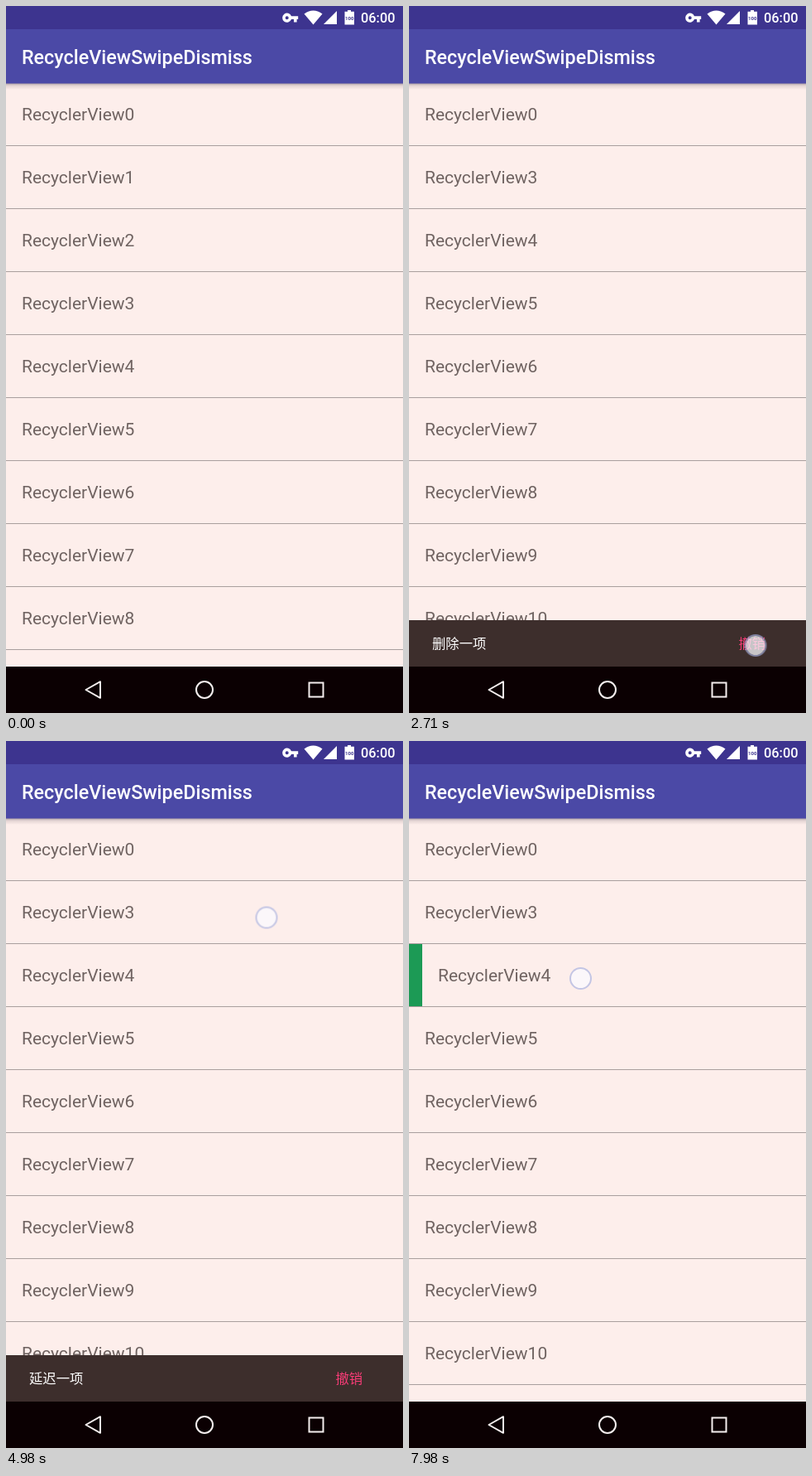
Write an HTML page that moves like this. It is 480 px wide and 853 px high and loops after 8000 ms.

```html
<!DOCTYPE html>
<html lang="zh">
<head>
<meta charset="utf-8">
<title>RecycleViewSwipeDismiss</title>
<style>
:root {
  --page: #fdeeeb;
  --move: cubic-bezier(.37, 0, .63, 1);
  --drag: cubic-bezier(.5, 0, .8, .7);
  --slide: cubic-bezier(.4, 0, .2, 1);
}
html, body { margin: 0; width: 100%; height: 100%; overflow: hidden; background: var(--page); }
#stage { position: relative; width: 480px; height: 853px; overflow: hidden; background: var(--page); }
#list { position: absolute; top: 93px; width: 480px; height: 704px; overflow: hidden; }

.row { position: relative; height: 76px; }
.line { position: absolute; top: 75px; width: 480px; height: 1px; background: #a99f9e; }
.body { position: absolute; width: 480px; height: 75px; overflow: hidden; }
.card, .under, .under svg { position: absolute; width: 480px; height: 75px; }
.card {
  background: var(--page); color: #6f6361; text-indent: 19px;
  font: 21px/77px Roboto, sans-serif; white-space: nowrap;
}
.done { background: #1c9a55; }
.later { background: #ee6d0c; }
.under path, .under circle { fill: none; stroke: #fff; stroke-width: 2.3; }

/* Every animation shares one 8 s clock: 1% = 80 ms */
.g2, .g3, .g4, .r1 *, .r2 *, .r3 *, .r4 *, #snack, #snack text, #dot, #dot i {
  animation-duration: 8s; animation-iteration-count: infinite; animation-timing-function: linear;
}

.g2 { animation-name: g2; animation-timing-function: var(--move); }
.g3 { animation-name: g3; animation-timing-function: var(--move); }
.g4 { animation-name: g4; animation-timing-function: var(--move); }
@keyframes g2 { 0%, 12.59% { transform: none } 15.71%, 100% { transform: translateY(-76px) } }
@keyframes g3 {
  0%, 25.56%, 39.38%, 54.69% { transform: none }
  28.69%, 36.25%, 57.81%, 100% { transform: translateY(-76px) }
}
@keyframes g4 {
  0%, 68.88%, 84.75%, 100% { transform: none }
  72%, 81.63% { transform: translateY(-76px) }
}

.r1 .card { animation-name: swipe1; }
.r2 .card { animation-name: swipe2; }
.r3 .card { animation-name: swipe3; }
.r4 .card { animation-name: swipe4; }
@keyframes swipe1 {
  0% { transform: none }
  6.88% { transform: none; animation-timing-function: var(--drag) }
  9.56% { transform: translateX(230px); animation-timing-function: ease-out }
  11.06%, 100% { transform: translateX(480px) }
}
@keyframes swipe2 {
  0% { transform: none }
  20% { transform: none; animation-timing-function: var(--drag) }
  22.63% { transform: translateX(230px); animation-timing-function: ease-out }
  24.13%, 35% { transform: translateX(480px) }
  35.01% { transform: none }
  48.75% { transform: none; animation-timing-function: var(--drag) }
  51.5% { transform: translateX(-240px); animation-timing-function: ease-out }
  53%, 100% { transform: translateX(-480px) }
}
@keyframes swipe3 {
  0% { transform: none }
  63.13% { transform: none; animation-timing-function: var(--drag) }
  65.88% { transform: translateX(-240px); animation-timing-function: ease-out }
  67.38%, 80% { transform: translateX(-480px) }
  80.01%, 100% { transform: none }
}
@keyframes swipe4 {
  0% { transform: none }
  97.88% { transform: none; animation-timing-function: var(--drag) }
  99.75%, 100% { transform: translateX(16px) }
}

.r1 .body { animation-name: fade1; }
.r2 .body { animation-name: fade2; }
.r3 .body { animation-name: fade3; }
@keyframes fade1 { 0%, 11.06% { opacity: 1 } 12.54%, 100% { opacity: 0 } }
@keyframes fade2 {
  0%, 24.13%, 40.85%, 53.28% { opacity: 1 }
  25.5%, 39.38%, 54.69%, 100% { opacity: 0 }
}
@keyframes fade3 {
  0%, 67.38%, 86.23%, 100% { opacity: 1 }
  68.85%, 84.75% { opacity: 0 }
}

.r1 .line { animation-name: line1; animation-timing-function: step-end; }
.r2 .line { animation-name: line2; animation-timing-function: step-end; }
.r3 .line { animation-name: line3; animation-timing-function: step-end; }
@keyframes line1 { 0% { opacity: 1 } 12.59%, 100% { opacity: 0 } }
@keyframes line2 { 0%, 36.25% { opacity: 1 } 25.56%, 54.69%, 100% { opacity: 0 } }
@keyframes line3 { 0%, 81.63%, 100% { opacity: 1 } 68.88% { opacity: 0 } }

/* The second row is first deleted, later postponed */
.r2 .later { animation-name: secondHalf; animation-timing-function: step-end; }
.r1 .later, .r4 .later { display: none; }
@keyframes secondHalf { 0% { opacity: 0 } 45%, 100% { opacity: 1 } }
@keyframes firstHalf { 0% { opacity: 1 } 45%, 100% { opacity: 0 } }

#tray { position: absolute; top: 741px; width: 480px; height: 56px; overflow: hidden; }
#snack {
  position: absolute; width: 480px; height: 56px; background: #3d2e2c;
  animation-name: snack; animation-timing-function: var(--slide);
}
#snack svg { display: block; }
#snack text { font: 16.33px "Noto Sans CJK SC", "Noto Sans CJK", sans-serif; fill: #fff; }
#snack .act { fill: #f83c77; }
#snack .labels { animation: labels 8s linear infinite; }
#snack .del { animation-name: firstHalf; animation-timing-function: step-end; }
#snack .post { animation-name: secondHalf; animation-timing-function: step-end; }
@keyframes snack {
  0%, 11.13%, 27.5%, 27.63%, 39.38%, 53.28%, 70.63%, 84.75%, 100% { transform: translateY(56px) }
  14.25%, 24.38%, 30.75%, 36.25%, 56.4%, 67.5%, 73.75%, 81.63% { transform: none }
}
@keyframes labels {
  0%, 12%, 26.63%, 28.5%, 38.5%, 54.16%, 69.75%, 71.5%, 83.88%, 100% { opacity: 0 }
  14.25%, 24.38%, 30.75%, 36.25%, 56.4%, 67.5%, 73.75%, 81.63% { opacity: 1 }
}

#chrome { position: absolute; inset: 0; }
#chrome text { font-family: Roboto, sans-serif; font-weight: 500; fill: #fff; }
.nav { fill: none; stroke: #f4eeee; stroke-width: 2; }

#dot { position: absolute; left: 0; top: 0; animation-name: dot; }
#dot i {
  position: absolute; left: -13.5px; top: -13.5px; width: 27px; height: 27px; box-sizing: border-box;
  border: 2px solid rgba(165, 175, 225, .65); border-radius: 50%;
  background: rgba(250, 250, 255, .74); background-clip: padding-box;
  animation-name: press; animation-timing-function: step-end;
}
@keyframes dot {
  0% { transform: translate(191px, 212px) }
  6.88% { transform: translate(191px, 212px); animation-timing-function: var(--drag) }
  9.56% { transform: translate(421px, 214px) }
  9.57% { transform: translate(191px, 212px) }
  20% { transform: translate(191px, 212px); animation-timing-function: var(--drag) }
  22.63% { transform: translate(421px, 214px) }
  22.64%, 37% { transform: translate(418.5px, 771px) }
  37.01% { transform: translate(314.5px, 212.5px) }
  48.75% { transform: translate(314.5px, 212.5px); animation-timing-function: var(--drag) }
  51.5% { transform: translate(74.5px, 213px) }
  51.51% { transform: translate(314.5px, 212.5px) }
  63.13% { transform: translate(314.5px, 212.5px); animation-timing-function: var(--drag) }
  65.88% { transform: translate(74.5px, 213px) }
  65.89%, 84% { transform: translate(418.5px, 771px) }
  84.01% { transform: translate(191px, 286px) }
  97.88% { transform: translate(191px, 286px); animation-timing-function: var(--drag) }
  99.75%, 100% { transform: translate(207px, 286px) }
}
@keyframes press {
  0%, 9.56%, 22.63%, 36%, 51.5%, 65.88%, 81.38% { opacity: 0 }
  5.87%, 19%, 33.85%, 47.74%, 62.23%, 78.87%, 96.87%, 100% { opacity: 1 }
}
</style>
</head>
<body>
<div id="stage">
  <div id="list"></div>

  <div id="tray">
    <div id="snack">
      <svg width="480" height="56">
        <g class="labels">
          <text class="del" x="28" y="34">删除一项</text>
          <text class="post" x="28" y="34">延迟一项</text>
          <text class="act" x="398.5" y="34">撤销</text>
        </g>
      </svg>
    </div>
  </div>

  <svg id="chrome" width="480" height="853">
    <defs>
      <linearGradient id="shade" x2="0" y2="1">
        <stop offset="0" stop-color="#3c2c3c" stop-opacity=".42"/>
        <stop offset=".4" stop-color="#3c2c3c" stop-opacity=".13"/>
        <stop offset="1" stop-color="#3c2c3c" stop-opacity="0"/>
      </linearGradient>
    </defs>
    <rect y="93" width="480" height="8" fill="url(#shade)"/>
    <rect width="480" height="28" fill="#3d348f"/>
    <rect y="28" width="480" height="65.5" fill="#4b49a6"/>
    <text x="19" y="70" font-size="23.33">RecycleViewSwipeDismiss</text>

    <g fill="#fff">
      <path fill-rule="evenodd" d="M345 12.3a5.6 5.6 0 1 0 0 3.8h3v3.4h3.6v-3.4h1.6v-3.8zM339.7 12.2a2 2 0 1 1 0 4a2 2 0 1 1 0-4z"/>
      <path d="M360.5 9.5Q371.5 1.5 382.5 9.5L371.5 22.5z"/>
      <path d="M400 6v16h-16z"/>
      <path d="M413 5h4v1.8h4V22.5h-11.5V6.8h3.5z"/>
    </g>
    <text x="415.2" y="16.8" font-size="6" text-anchor="middle" style="fill:#3d348f;font-weight:700">100</text>
    <text x="429" y="20.3" font-size="16.33">06:00</text>

    <rect y="797" width="480" height="56" fill="#0b0002"/>
    <path class="nav" stroke-linejoin="round" d="M96.5 825L114 815.2V834.8z"/>
    <circle class="nav" cx="240" cy="825" r="10"/>
    <rect class="nav" x="366.5" y="816.5" width="17" height="17"/>
  </svg>

  <div id="dot"><i></i></div>
</div>

<script>
const underlay = `
  <div class="under done"><svg><path d="M22.5 38.5l5.5 5.5L42 30"/></svg></div>
  <div class="under later"><svg><circle cx="447.3" cy="38.5" r="10.6"/><path d="M447 32v7l5.4 3.3" style="stroke-width:1.8"/></svg></div>`;

function add(parent, className, html = '') {
  const el = document.createElement('div');
  el.className = className;
  el.innerHTML = html;
  return parent.appendChild(el);
}

// Rows from 2, 3 and 4 on sit in nested groups that close up or open together.
let group = document.getElementById('list');
for (let i = 0; i <= 12; i++) {
  if (i >= 2 && i <= 4) group = add(group, 'g' + i);
  add(group, 'row r' + i, `<div class="line"></div><div class="body">${
    i >= 1 && i <= 4 ? underlay : ''}<div class="card">RecyclerView${i}</div></div>`);
}
</script>
</body>
</html>
```
